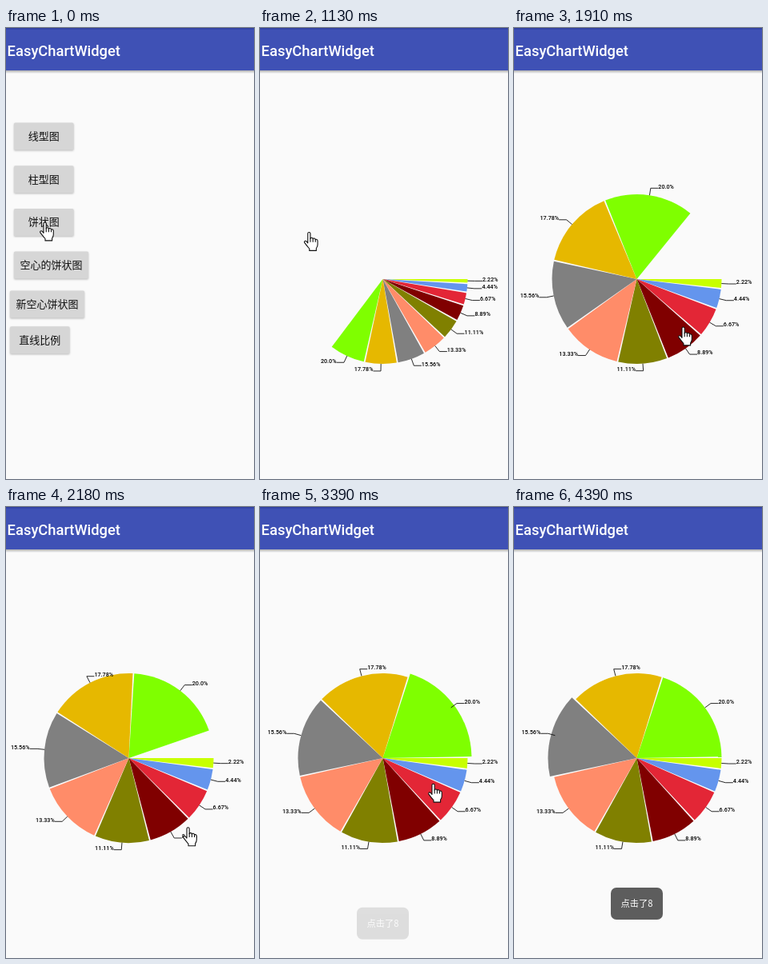
Write an HTML page that moves like this. It is 310 px wide and 564 px high and loops after 4.67 s.

```html
<!DOCTYPE html>
<html lang="zh">
<head>
<meta charset="utf-8">
<title>EasyChartWidget</title>
<style>
  html, body { margin: 0; width: 100%; height: 100%; overflow: hidden; background: #fafafa; }
  svg { display: block; width: 310px; height: 564px; }
  text { font-family: Roboto, "Noto Sans CJK SC", "Noto Sans CJK", sans-serif; }
  .title { font-size: 18.35px; font-weight: 500; fill: #fff; }
  .btn rect { fill: #d6d6d6; filter: drop-shadow(0 1px 1px rgba(0, 0, 0, .25)); }
  .btn text, .toast text { font-family: "Noto Sans CJK SC", "Noto Sans CJK", sans-serif; text-anchor: middle; }
  .btn text { font-size: 13px; fill: #111; }
  .label text { font-size: 7.2px; font-weight: 500; fill: #000; }
  .label path { fill: none; stroke: #111; stroke-width: .9; }
  .toast rect { fill: #5d5d5d; }
  .toast text { font-size: 11.3px; fill: #fff; }
  .hand { fill: #fff; stroke: #111; stroke-width: 1.1; stroke-linejoin: round; }
</style>
</head>
<body>
<svg viewBox="0 0 310 564">
  <defs>
    <linearGradient id="shade" x2="0" y2="1">
      <stop offset="0" stop-color="#000" stop-opacity=".3"/>
      <stop offset="1" stop-color="#000" stop-opacity="0"/>
    </linearGradient>
    <g id="page">
      <rect x="-13.5" width="360" height="564" fill="#fafafa"/>
      <rect x="-13.5" y="53" width="360" height="4" fill="url(#shade)"/>
      <rect x="-13.5" width="360" height="53" fill="#3f51b5"/>
      <rect x="-13.5" width="360" height="1.5" fill="#303f9f"/>
      <text class="title" x="1.6" y="34.5">EasyChartWidget</text>
    </g>
  </defs>
  <g id="menu">
    <use href="#page"/>
    <g id="buttons"></g>
    <rect id="dim" x="-13.5" width="360" height="564"/>
  </g>
  <g id="chart">
    <use href="#page"/>
    <g id="slices"></g>
    <g id="labels"></g>
  </g>
  <g id="toast" class="toast">
    <rect x="121" y="476" width="65" height="40" rx="7"/>
    <text x="153.5" y="500.3">点击了8</text>
  </g>
  <g id="hand" class="hand">
    <path d="M5 14V2.3Q5 .7 6.6 .7T8.2 2.3V8.5Q8.4 7.4 9.8 7.5Q11.3 7.6 11.4 9Q11.8 8 13.2 8.2Q14.4 8.5 14.5 9.9Q15.2 9.2 16.3 9.7Q17.3 10.2 17.3 11.5V16Q17.3 18.5 15.6 20.7V23.6H7V21.2Q4.5 18.5 .9 13.6Q.2 12.3 1.3 11.6Q2.5 11 3.8 12.5Z"/>
    <path fill="none" d="M8.2 8V13M11.4 9V13M14.5 10V13"/>
  </g>
</svg>
<script>
const LOOP = 4670, START = 680, BEAT = 135.4;
const CX = 153.5, CY = 314, R = 106, GAP = 1, WIDTH = 340;
const $ = id => document.getElementById(id);
const clamp = v => Math.min(1, Math.max(0, v));

function add(parent, tag, attrs = {}, text = '') {
  const el = document.createElementNS('http://www.w3.org/2000/svg', tag);
  for (const k in attrs) el.setAttribute(k, attrs[k]);
  el.textContent = text;
  return parent.appendChild(el);
}

const names = ['线型图', '柱型图', '饼状图', '空心的饼状图', '新空心饼状图', '直线比例'];
names.forEach((name, i) => {
  const upper = i < 4;
  const x = upper ? 10 : 5;
  const y = upper ? 118.5 + 53.7 * i : 149.3 + 44.8 * i;
  const width = Math.max(74.5, 13 * name.length + 15);
  const g = add($('buttons'), 'g', { class: 'btn' });
  add(g, 'rect', { x, y, width, height: 34, rx: 1.5 });
  add(g, 'text', { x: x + width / 2, y: y + 21.5 }, name);
});

const colors = ['#c8ff00', '#6495ed', '#e32636', '#800000', '#808000', '#ff8c69', '#808080', '#e6b800', '#7fff00'];
const slices = colors.map((fill, i) => {
  const label = add($('labels'), 'g', { class: 'label' });
  const percent = Math.round((i + 1) / 45 * 1e4) / 100;
  return {
    start: 4 * i * (i + 1) - GAP * i,
    size: 8 * (i + 1) - GAP,
    shape: add($('slices'), 'path', { fill }),
    line: add(label, 'path'),
    text: add(label, 'text', {}, (percent % 1 ? percent : percent.toFixed(1)) + '%')
  };
});

// Key points: beat, then values.
const unswept = [[0, 1], [1, .975], [6, .57], [9, .377], [14, 0]];
const handPath = [[2, 42, 242.3], [6, 93, 292.3], [9, 205, 373.3], [12, 229, 413.5], [15, 229, 413.5],
  [18, 189, 283], [19, 252, 252], [20, 210, 345.5], [22, 73, 288], [25, 222, 495], [26, 259, 540]];

function at(track, beat) {
  const i = track.findIndex(key => key[0] > beat);
  if (i <= 0) return track.at(i).slice(1);
  const [a, b] = [track[i - 1], track[i]];
  const u = (beat - a[0]) / (b[0] - a[0]);
  return a.map((v, n) => v + (b[n] - v) * u).slice(1);
}

function polar(deg, r) {
  const a = deg * Math.PI / 180;
  return [CX + r * Math.cos(a), CY + r * Math.sin(a)];
}

function drawPie(scale, picked) {
  slices.forEach((s, i) => {
    const from = s.start * scale + GAP * i;
    const sweep = s.size * scale;
    const end = from + sweep;
    const mid = from + sweep / 2;
    const r = i === picked ? R + 5 : R;
    s.shape.setAttribute('d', `M${CX} ${CY}L${polar(from, r)}A${r} ${r} 0 0 1 ${polar(end, r)}Z`);

    const left = end > 90 && end < 270;
    const [x, y] = polar(mid, R + 9);
    const tip = x + (left ? -9.5 : 9.5);
    s.line.setAttribute('d', `M${polar(mid, R)}L${x} ${y}H${tip}`);
    s.text.setAttribute('x', tip);
    s.text.setAttribute('y', y + .4);
    s.text.setAttribute('text-anchor', left ? 'end' : 'start');
  });
}

const move = (el, x, y = 0) => el.setAttribute('transform', `translate(${x} ${y})`);
const show = (el, on) => el.setAttribute('visibility', on ? 'visible' : 'hidden');

function draw(beat) {
  // The new page eases in over the menu, which drifts left and darkens.
  const x = WIDTH * (1 - clamp((beat + 1) / 3.38)) ** 2;
  const entered = WIDTH - x;
  move($('menu'), -entered * .221);
  $('dim').setAttribute('opacity', entered / WIDTH * .378);
  move($('chart'), x);
  show($('chart'), beat >= 0);

  const [left] = at(unswept, beat);
  drawPie(1 - left * left, beat >= 27 ? 6 : beat >= 19 ? 8 : -1);

  const rise = clamp((beat - 19.33) / 2.67);
  move($('toast'), 0, 33 * (1 - rise));
  $('toast').setAttribute('opacity', rise ** 1.25);

  move($('hand'), ...at(handPath, beat));
  show($('hand'), beat < 27);
}

// The picture refreshes once per beat after a still opening.
let last;
function tick() {
  const now = performance.now() % LOOP;
  const beat = now < 705 ? -1 : Math.floor((now - START) / BEAT);
  if (beat !== last) draw(last = beat);
  requestAnimationFrame(tick);
}
tick();
</script>
</body>
</html>
```
